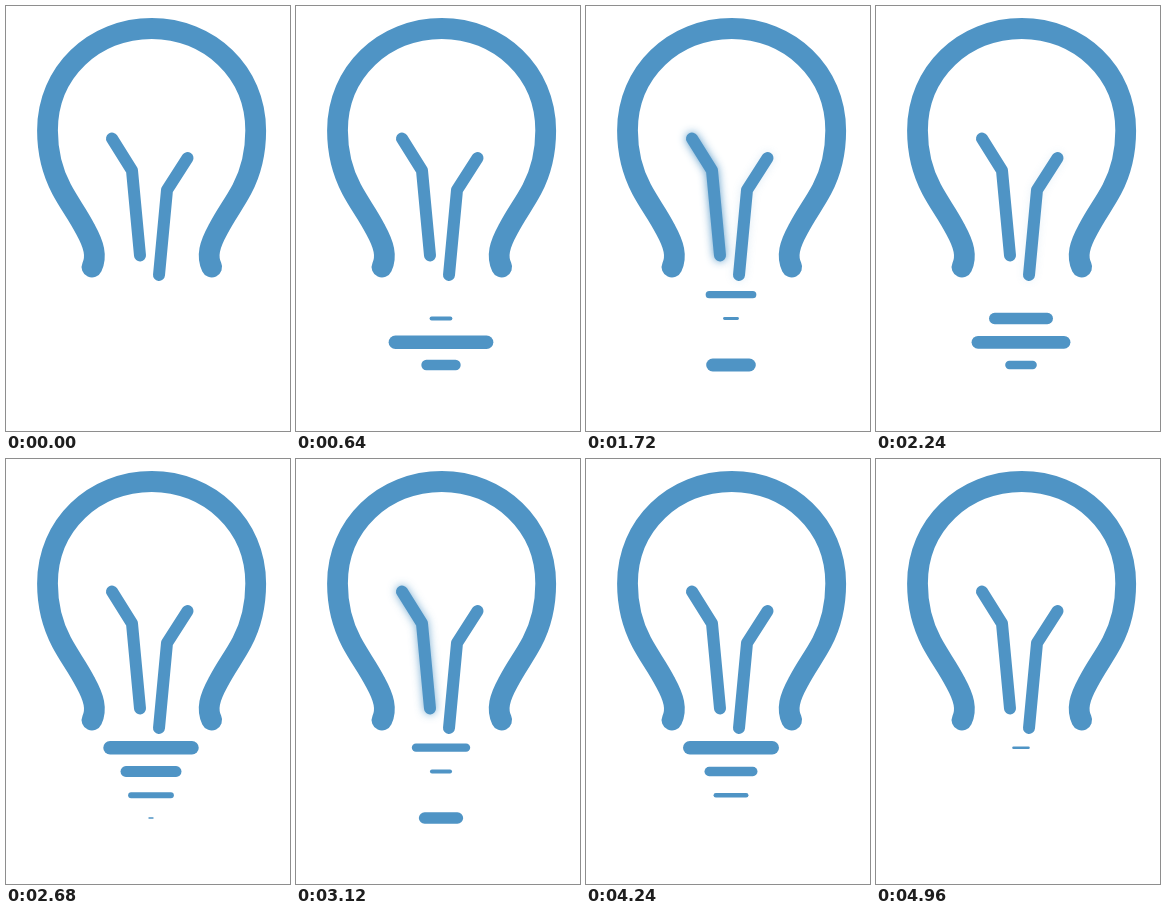
Recreate the animation shown at these times as an HTML page with a canvas. Size 284 by 425 pixels, loop 5000 ms.

```html
<!DOCTYPE html>
<html lang="en">
<head>
<meta charset="utf-8">
<title>Light bulb</title>
<style>
html, body { margin: 0; width: 100%; height: 100%; overflow: hidden; background: #fff; }
canvas { display: block; }
</style>
</head>
<body>
<canvas id="stage" width="284" height="425"></canvas>
<script>
const ctx = document.getElementById('stage').getContext('2d');
const LOOP = 5000, CYCLE = 1470, CYCLES = 3;
const BLUE = '#4f94c5';
const CENTER = 145;

const bulb = new Path2D(
  'M86 261 C91 250 88 239 79.5 223.5 C71 207 64 199 55.5 183 ' +
  'C46 165 41.5 145 41.5 124.5 C41.5 66 88 22.5 145.7 22.5 ' +
  'C203 22.5 249.7 66 249.7 124.5 C249.7 145 245.5 165 236 183 ' +
  'C227.5 199 220.5 207 212 223.5 C203.5 239 200.5 250 205.7 261');

const filaments = [
  { path: new Path2D('M106 132.5 L126 164.5 L134 249.5'), delay: 1560 },
  { path: new Path2D('M181.5 152 L161 184 L153 269'), delay: 1700 }
];

// Bars start one after another, from the bottom up.
const bars = [
  { y: 359, width: 52, delay: 0 },
  { y: 336.3, width: 105, delay: 290 },
  { y: 312.5, width: 77, delay: 600 },
  { y: 288.7, width: 96, delay: 880 }
];

const clamp = x => Math.max(0, Math.min(1, x));

// Time since the start of the current cycle, or -1 when idle.
function localTime(t, delay) {
  const s = t - delay;
  return s < 0 || s >= CYCLE * CYCLES ? -1 : s % CYCLE;
}

// Quick eased growth, then a steady shrink.
function barScale(s) {
  if (s < 0) return 0;
  return s < 430 ? 1 - (1 - s / 430) ** 3.5 : clamp((1300 - s) / 870);
}

function glowLevel(s) {
  if (s < 0) return 0;
  return s < 120 ? s / 120 : clamp((600 - s) / 480);
}

function drawBar({ y, width, delay }, t) {
  const scale = barScale(localTime(t, delay));
  if (scale < 0.005) return;
  const w = width * scale, h = 13.6 * scale;
  ctx.beginPath();
  ctx.roundRect(CENTER - w / 2, y - h / 2, w, h, h / 2);
  ctx.fill();
}

function drawFilament({ path, delay }, t) {
  const glow = glowLevel(localTime(t, delay)) * clamp((4960 - t) / 200);
  ctx.save();
  ctx.shadowColor = `rgba(79, 148, 197, ${glow})`;
  ctx.shadowBlur = 8;
  ctx.stroke(path);
  ctx.restore();
}

function draw(now) {
  const t = now % LOOP;
  ctx.fillStyle = '#fff';
  ctx.fillRect(0, 0, 284, 425);
  ctx.fillStyle = ctx.strokeStyle = BLUE;
  ctx.lineCap = ctx.lineJoin = 'round';
  ctx.lineWidth = 20.8;
  ctx.stroke(bulb);
  ctx.lineWidth = 12;
  filaments.forEach(f => drawFilament(f, t));
  bars.forEach(b => drawBar(b, t));
}

const start = performance.now();
function tick() {
  draw(performance.now() - start);
  requestAnimationFrame(tick);
}
tick();
</script>
</body>
</html>
```
